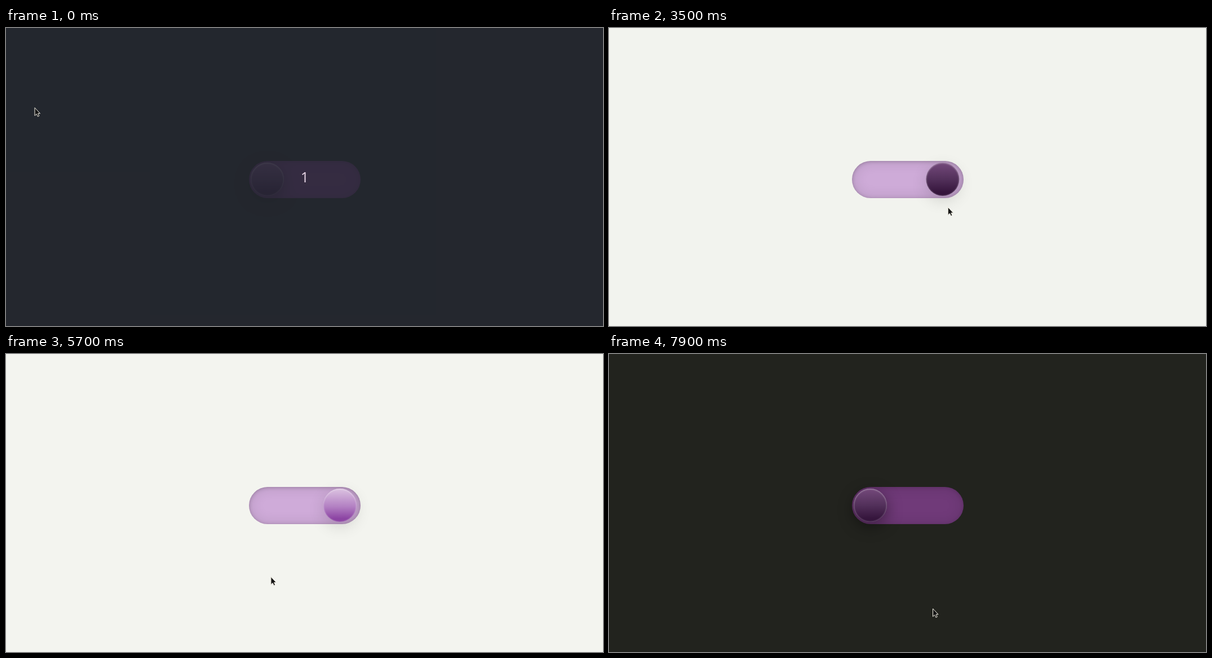
These frames come from a looping animation (1059 px wide and 529 px high, 8000 ms). An HTML page:

```html
<!DOCTYPE html>
<html lang="en">
<head>
<meta charset="utf-8">
<title>Theme switch</title>
<style>
  html, body { margin: 0; width: 100%; height: 100%; overflow: hidden; }
  #stage { position: relative; width: 1059px; height: 529px; overflow: hidden; }
  #stage > * { position: absolute; }
  #pill { left: 430.5px; top: 235.5px; width: 198px; height: 66px; border-radius: 33px; }
  #knob { left: 0; top: 239px; width: 59px; height: 59px; border-radius: 50%; }
  #veil { inset: 0; background: rgba(37,40,50,.78); }
  #count {
    left: 510px; top: 246px; width: 40px; text-align: center; color: #ead9e8;
    font: 25px/36px "Open Sans", "Noto Sans", sans-serif;
  }
  svg { left: 0; top: 0; overflow: visible; }
</style>
</head>
<body>
<div id="stage">
  <div id="pill"></div>
  <div id="knob"></div>
  <div id="veil"></div>
  <div id="count">1</div>
  <svg id="arrow" width="12" height="18">
    <path d="M.5 .5V14.6L3.7 11.6L5.9 16.2L8.2 15.1L6.2 10.7H10Z" fill="#151515" stroke="#f4f1e6" stroke-linejoin="round"/>
  </svg>
  <svg id="hand" width="15" height="16">
    <path d="M-1.2 8V1.2Q-1.2 0 0 0T1.2 1.2V4.6Q2.2 3.8 3.4 4.8Q4.6 4.3 5.5 5.5Q8.4 5.2 8.3 8Q8.2 10.8 6.8 12.3V14H-1.5V12.6Q-3.4 10.8-4.9 8.4Q-5.1 6.8-3.4 6.9Z"
      fill="#fff" stroke="#222" stroke-width=".9" stroke-linejoin="round"/>
    <path d="M1.5 9v3M3.5 9v3M5.5 9v3" stroke="#555" stroke-width=".6" fill="none"/>
  </svg>
</div>
<script>
const LOOP = 8000, STEP = 100, FADE = 500;
const $ = id => document.getElementById(id);
const [stage, pill, knob, veil, count, arrow, hand] =
  ["stage", "pill", "knob", "veil", "count", "arrow", "hand"].map($);

// Every click toggles the switch, which starts dark
const clicks = [1455, 3478, 5300, 7400];

// Pointer moves; sag bends the way downwards
const home = { x: 50.5, y: 141 };
const moves = [
  { from: 0, to: 400, x: 295, y: 443 },
  { from: 500, to: 900, x: 454, y: 293 },
  { from: 1000, to: 1200, x: 457, y: 281 },
  { from: 1530, to: 2000, x: 394, y: 387, sag: 12 },
  { from: 2500, to: 2900, x: 613, y: 314 },
  { from: 3000, to: 3200, x: 609, y: 283 },
  { from: 3400, to: 3800, x: 556, y: 504 },
  { from: 4400, to: 4900, x: 468.5, y: 293 },
  { from: 5300, to: 5800, x: 469.5, y: 413, sag: -15 },
  { from: 6400, to: 7000, x: 613, y: 280.5, sag: 50 },
  { from: 7400, to: 7900, x: 574, y: 451.5 }
];

const mix = (a, b, p) => a + (b - a) * p;
const mixRgb = (a, b, p) => `rgb(${a.map((v, i) => Math.round(mix(v, b[i], p)))})`;
const clamp = v => Math.min(1, Math.max(0, v));
const smooth = p => p * p * (3 - 2 * p);

// cubic-bezier(.25, .1, .25, 1)
function ease(x) {
  const curve = (a, b, s) => 3 * a * s * (1 - s) ** 2 + 3 * b * s * s * (1 - s) + s ** 3;
  let lo = 0, hi = 1;
  for (let i = 0; i < 30; i++) {
    const mid = (lo + hi) / 2;
    if (curve(.25, .25, mid) < x) lo = mid; else hi = mid;
  }
  return curve(.1, 1, hi);
}

function switchState(t) {
  const done = clicks.filter(c => c <= t);
  if (!done.length) return { on: false, level: 0 };
  const on = done.length % 2 === 1;
  const p = ease(clamp((t - done[done.length - 1]) / FADE));
  return { on, level: on ? p : 1 - p };
}

function pointerAt(t) {
  let { x, y } = home;
  for (const m of moves) {
    if (t <= m.from) break;
    const p = smooth(clamp((t - m.from) / (m.to - m.from)));
    x = mix(x, m.x, p);
    y = mix(y, m.y, p) + 4 * (m.sag || 0) * p * (1 - p);
  }
  return [x, y];
}

function overPill(x, y) {
  const nearest = Math.min(595.5, Math.max(463.5, x));
  return Math.hypot(x - nearest, y - 268.5) < 33;
}

function place(el, x, y, visible) {
  el.style.transform = `translate(${x}px, ${y}px)`;
  el.style.visibility = visible ? "visible" : "hidden";
}

function draw(t) {
  const { on, level } = switchState(t);
  stage.style.background = mixRgb([34, 35, 30], [248, 249, 244], level);
  pill.style.backgroundColor = mixRgb([112, 58, 121], [209, 174, 219], level);
  pill.style.boxShadow =
    `inset 0 0 24px rgba(0,0,0,.12), inset 0 1px 6px rgba(0,0,0,${mix(.12, .22, level)})`;
  knob.style.transform = `translateX(${mix(434, 566, level)}px)`;
  knob.style.background = on
    ? "linear-gradient(#dcc3e1, #b27fc2 55%, #8c44a3 90%)"
    : "linear-gradient(#74497b, #52305a 50%, #35153c 90%)";
  knob.style.boxShadow =
    `0 8px 28px rgba(0,0,0,${mix(.45, .13, level)}), ` +
    "inset 0 1px 3px rgba(255,255,255,.3), inset 0 0 3px rgba(255,255,255,.3)";

  veil.hidden = count.hidden = t >= STEP;

  const [x, y] = pointerAt(t), over = overPill(x, y);
  place(arrow, x, y, !over);
  place(hand, x, y, over);
}

function tick(now) {
  draw(Math.floor((now % LOOP) / STEP) * STEP);
  requestAnimationFrame(tick);
}
draw(0);
requestAnimationFrame(tick);
</script>
</body>
</html>
```
